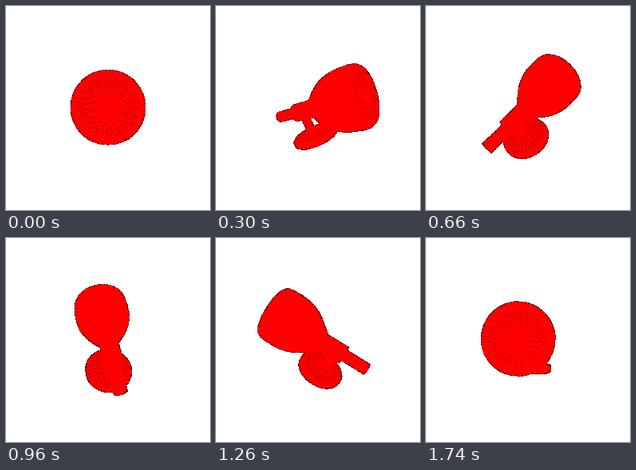
These frames come from a looping animation (256x256 px, 1.8 s). An HTML page without scripts:

```html
<!DOCTYPE html>
<html lang="en">
<head>
<meta charset="utf-8">
<title>Turning solid</title>
<style>
  html, body { margin: 0; width: 100%; height: 100%; overflow: hidden; background: #fff; }
  .stage {
    position: absolute; left: 0; top: 0; width: 256px; height: 256px; overflow: hidden;
    perspective: 260px; perspective-origin: 128px 126.5px; filter: url(#ink);
  }
  .model, .wheel { position: absolute; transform-style: preserve-3d; width: 0; height: 0; }
  .model { left: 128px; top: 126.5px; animation: spin 1.8s steps(30) infinite; }
  .wheel { left: 0; top: 0; transform: translate3d(0, 37px, -23px) rotateX(90deg); }
  @keyframes spin {
    from { transform: rotate3d(0, 2, -1, 0deg); }
    to { transform: rotate3d(0, 2, -1, 360deg); }
  }
  /* round slices across an axis */
  b {
    position: absolute; border-radius: 50%; background: #f00;
    width: calc(var(--r) * 2px); height: calc(var(--r) * 2px);
    left: calc(var(--r) * -1px); top: calc(var(--r) * -1px);
    transform: translateZ(calc(var(--z) * 1px));
  }
  /* lengthwise sections through the main axis */
  .cut {
    position: absolute; left: -80px; top: -40px; width: 160px; height: 80px;
    transform: rotateZ(var(--a)) rotateY(-90deg);
  }
  .face {
    position: absolute; left: -40px; top: -40px; width: 80px; height: 80px;
    transform: translateZ(calc(var(--z) * 1px));
  }
  .stem {
    position: absolute; left: -6.5px; top: 6px; width: 13px; height: 28px; background: #f00;
    transform: translateZ(-27px) rotateY(var(--a));
  }
  .defs { position: absolute; width: 0; height: 0; }
</style>
</head>
<body>
<svg class="defs">
  <defs>
    <path id="half" fill="#f00" d="M-71 .2V-7.6H-38V-12H-8C8-24 18-36.9 46-36.9C58-36.9 64-35.5 66-33.5V.2z"/>
    <g id="section"><use href="#half"/><use href="#half" transform="scale(1 -1)"/></g>
    <g id="specks" fill="none" stroke="#000" stroke-width=".75">
      <circle r="13" stroke-dasharray=".8 8.3"/>
      <circle r="16" stroke-dasharray=".8 5.9"/>
      <circle r="18.5" stroke-dasharray=".8 4.7 .8 7.6"/>
      <circle r="21" stroke-dasharray=".8 4.1"/>
      <circle r="23.5" stroke-dasharray=".8 5.3 .8 3.4"/>
      <circle r="26" stroke-dasharray=".8 6.7"/>
      <circle r="28.5" stroke-dasharray=".8 8.9 .8 5.2"/>
    </g>
    <g id="core" fill="none" stroke="#000" stroke-width=".75">
      <circle r="4" stroke-dasharray=".8 4.3"/>
      <circle r="7" stroke-dasharray=".8 3.7"/>
      <circle r="10" stroke-dasharray=".8 4.9"/>
    </g>
    <!-- crisp shape with a broken dark rim -->
    <filter id="ink" x="0" y="0" width="1" height="1" color-interpolation-filters="sRGB">
      <feComponentTransfer in="SourceGraphic" result="shape">
        <feFuncA type="discrete" tableValues="0 1"/>
      </feComponentTransfer>
      <feMorphology in="shape" operator="erode" radius="1" result="inner"/>
      <feComposite in="shape" in2="inner" operator="out" result="edge"/>
      <feTurbulence type="fractalNoise" baseFrequency=".8" numOctaves="1" seed="4"/>
      <feColorMatrix values="0 0 0 0 0  0 0 0 0 0  0 0 0 0 0  30 0 0 0 -15"/>
      <feComposite in2="edge" operator="in" result="rim"/>
      <feMerge><feMergeNode in="shape"/><feMergeNode in="rim"/></feMerge>
    </filter>
  </defs>
</svg>

<div class="stage">
  <div class="model">
    <svg class="cut" style="--a:0deg" viewBox="-80 -40 160 80"><use href="#section"/></svg>
    <svg class="cut" style="--a:15deg" viewBox="-80 -40 160 80"><use href="#section"/></svg>
    <svg class="cut" style="--a:30deg" viewBox="-80 -40 160 80"><use href="#section"/></svg>
    <svg class="cut" style="--a:45deg" viewBox="-80 -40 160 80"><use href="#section"/></svg>
    <svg class="cut" style="--a:60deg" viewBox="-80 -40 160 80"><use href="#section"/></svg>
    <svg class="cut" style="--a:75deg" viewBox="-80 -40 160 80"><use href="#section"/></svg>
    <svg class="cut" style="--a:90deg" viewBox="-80 -40 160 80"><use href="#section"/></svg>
    <svg class="cut" style="--a:105deg" viewBox="-80 -40 160 80"><use href="#section"/></svg>
    <svg class="cut" style="--a:120deg" viewBox="-80 -40 160 80"><use href="#section"/></svg>
    <svg class="cut" style="--a:135deg" viewBox="-80 -40 160 80"><use href="#section"/></svg>
    <svg class="cut" style="--a:150deg" viewBox="-80 -40 160 80"><use href="#section"/></svg>
    <svg class="cut" style="--a:165deg" viewBox="-80 -40 160 80"><use href="#section"/></svg>

    <b style="--z:-71;--r:7.6"></b>
    <b style="--z:-55;--r:7.6"></b>
    <b style="--z:-38;--r:12"></b>
    <b style="--z:-23;--r:12"></b>
    <b style="--z:-8;--r:12"></b>
    <b style="--z:4;--r:21.5"></b>
    <b style="--z:15;--r:29"></b>
    <b style="--z:25;--r:33.5"></b>
    <b style="--z:35;--r:36"></b>
    <b style="--z:46;--r:36.9"></b>
    <b style="--z:56;--r:36.6"></b>
    <b style="--z:62;--r:35.6"></b>
    <b style="--z:66;--r:33.5"></b>
    <svg class="face" style="--z:66.4" viewBox="-40 -40 80 80"><use href="#specks"/></svg>

    <i class="stem" style="--a:0deg"></i>
    <i class="stem" style="--a:60deg"></i>
    <i class="stem" style="--a:120deg"></i>

    <div class="wheel">
      <b style="--z:-5;--r:29.5"></b>
      <b style="--z:-3;--r:30.7"></b>
      <b style="--z:-1;--r:30.9"></b>
      <b style="--z:1;--r:30.9"></b>
      <b style="--z:3;--r:30.7"></b>
      <b style="--z:5;--r:29.5"></b>
      <svg class="face" style="--z:5.4" viewBox="-40 -40 80 80"><use href="#specks"/><use href="#specks" transform="rotate(40) scale(.93)"/><use href="#core"/></svg>
      <svg class="face" style="--z:-5.4" viewBox="-40 -40 80 80"><use href="#specks"/><use href="#core"/></svg>
    </div>
  </div>
</div>
</body>
</html>
```
